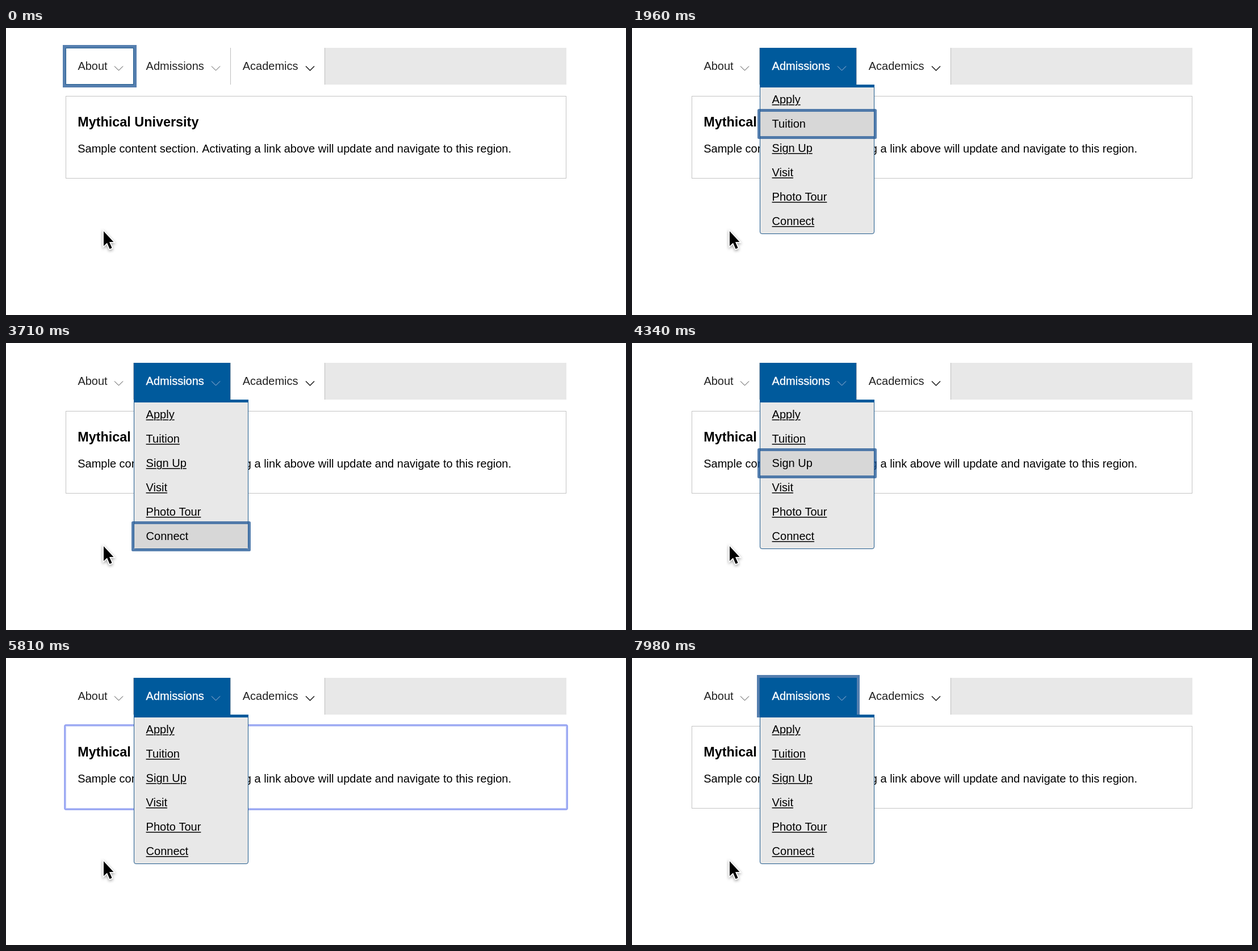
Recreate the animation shown at these times as an HTML page with a canvas. Size 1092 by 507 pixels, loop 8 s.

```html
<!DOCTYPE html>
<html lang="en">
<head>
<meta charset="utf-8">
<title>Disclosure navigation</title>
<style>
  html, body { margin: 0; width: 100%; height: 100%; overflow: hidden; background: #fff; }
  canvas { display: block; width: 1092px; height: 507px; }
</style>
</head>
<body>
<canvas id="stage" width="1092" height="507"></canvas>
<script>
const ctx = document.getElementById('stage').getContext('2d');
const FONT = '"Liberation Sans", Arial, Helvetica, sans-serif';
const LOOP = 8000;
const MENU_OPENS = 910;
const BLUE = '#005a9c', EDGE = '#1f5a8c', RING = 'rgba(28,84,148,.75)';
const GREY = '#e8e8e8', LINE = '#bdbdbd';

const buttons = [
  { label: 'About', x: 105, right: 225, textX: 126.4, arrowX: 198.5, arrow: '#444', weight: 1 },
  { label: 'Admissions', x: 225, right: 396, textX: 246.6, arrowX: 369.5, arrow: '#555', weight: 1 },
  { label: 'Academics', x: 396, right: 562, textX: 416.7, arrowX: 535.5, arrow: '#111', weight: 1.4 }
];
const links = ['Apply', 'Tuition', 'Sign Up', 'Visit', 'Photo Tour', 'Connect'];

// Keyboard focus over time: a button label, a link or the content region.
const focusChanges = [
  [0, 'About'], [350, 'Admissions'],
  [1680, 'Apply'], [1960, 'Tuition'], [2240, 'Sign Up'], [2450, 'Visit'],
  [2660, 'Photo Tour'], [2870, 'Connect'],
  [3990, 'Photo Tour'], [4130, 'Visit'], [4340, 'Sign Up'], [4550, 'Tuition'], [4760, 'Apply'],
  [5810, 'region'], [7210, 'About'], [7630, 'Admissions']
];

function rect(x, y, w, h, color) {
  ctx.fillStyle = color;
  ctx.fillRect(x, y, w, h);
}

function outline(x, y, w, h, width, color) {
  ctx.strokeStyle = color;
  ctx.lineWidth = width;
  ctx.strokeRect(x - width / 2, y - width / 2, w + width, h + width);
}

function innerBorder(x, y, w, h, color) {
  outline(x + 1, y + 1, w - 2, h - 2, 1, color);
}

function text(str, x, y, color = '#000', font = '20px ') {
  ctx.font = font + FONT;
  ctx.fillStyle = color;
  ctx.fillText(str, x, y);
}

function roundStroke(x, y, w, h, radius, width, color) {
  ctx.beginPath();
  ctx.roundRect(x, y, w, h, radius);
  ctx.strokeStyle = color;
  ctx.lineWidth = width;
  ctx.stroke();
}

function chevron(x, color, width) {
  ctx.beginPath();
  ctx.moveTo(x - 7.5, 67.5);
  ctx.lineTo(x, 75);
  ctx.lineTo(x + 7.5, 67.5);
  ctx.strokeStyle = color;
  ctx.lineWidth = width;
  ctx.stroke();
}

function drawNav(focus, open) {
  rect(105, 35, 882, 65, GREY);
  rect(105, 35, 456, 65, '#fff');
  for (const b of buttons) rect(b.right - 1, 35, 1, 65, LINE);

  for (const b of buttons) {
    const active = open && b.label === 'Admissions';
    const focused = b.label === focus;
    const w = b.right - b.x;
    if (active) rect(b.x, 35, focused ? w : w - 1, 65, BLUE);
    else if (focused) innerBorder(b.x, 35, w, 65, EDGE);
    text(b.label, b.textX, 74, active ? '#fff' : '#222');
    if (active) {
      ctx.strokeStyle = '#fff';
      ctx.lineWidth = .35;
      ctx.strokeText(b.label, b.textX, 74);
    }
    chevron(b.arrowX, active ? '#a9bcd9' : b.arrow, b.weight);
  }
  const b = buttons.find(b => b.label === focus);
  if (b) outline(b.x, 35, b.right - b.x, 65, 5, RING);
}

function drawRegion(focused) {
  innerBorder(105, 120, 882, 146, '#c4c4c4');
  if (focused) {
    roundStroke(104, 119, 884, 148, 2, 4, '#bcc6f8');
    roundStroke(103.5, 118.5, 885, 149, 2, 2, '#92a0f1');
  }
  text('Mythical University', 126.2, 174, '#000', 'bold 23.4px ');
  text('Sample content section. Activating a link above will update and navigate to this region.', 126.2, 220);
}

function underlined(str, x, y) {
  ctx.font = '20px ' + FONT;
  rect(x, y + 2, ctx.measureText(str).width, 1.5, '#000');
  // A halo in the background colour opens gaps around descenders.
  ctx.strokeStyle = GREY;
  ctx.lineWidth = 2.6;
  ctx.strokeText(str, x, y);
  text(str, x, y);
}

function drawMenu(focus) {
  ctx.beginPath();
  ctx.roundRect(225, 100, 202, 264, [0, 0, 4, 4]);
  ctx.fillStyle = GREY;
  ctx.fill();
  roundStroke(225.5, 100.5, 201, 263, [0, 0, 3.5, 3.5], 1, EDGE);
  rect(225, 100, 202, 5, BLUE);

  links.forEach((link, i) => {
    const y = 105 + 43 * i;
    if (link === focus) {
      rect(226, y, 200, 43, '#d7d7d7');
      text(link, 246.6, y + 28);
    } else {
      underlined(link, 246.6, y + 28);
    }
  });
  const i = links.indexOf(focus);
  if (i >= 0) outline(226, 105 + 43 * i, 200, 43, 5, RING);
}

function drawPointer() {
  const points = [[172, 359], [172, 385], [178, 379.6], [182.6, 390.2], [186.6, 388.5], [182, 378], [189.5, 378]];
  ctx.save();
  ctx.beginPath();
  points.forEach(([x, y]) => ctx.lineTo(x, y));
  ctx.closePath();
  ctx.lineJoin = 'miter';
  ctx.shadowColor = 'rgba(0,0,0,.4)';
  ctx.shadowBlur = 5;
  ctx.shadowOffsetY = 2;
  ctx.strokeStyle = '#fff';
  ctx.lineWidth = 3.4;
  ctx.stroke();
  ctx.shadowColor = 'transparent';
  ctx.fillStyle = '#000';
  ctx.fill();
  ctx.restore();
}

function draw(time) {
  const focus = focusChanges.filter(([start]) => start <= time).pop()[1];
  const open = time >= MENU_OPENS;
  ctx.lineJoin = 'miter';
  rect(0, 0, 1092, 507, '#fff');
  drawNav(focus, open);
  drawRegion(focus === 'region');
  ctx.lineJoin = 'round';
  if (open) drawMenu(focus);
  drawPointer();
}

const start = performance.now();
function tick() {
  draw((performance.now() - start) % LOOP);
  requestAnimationFrame(tick);
}
tick();
</script>
</body>
</html>
```
